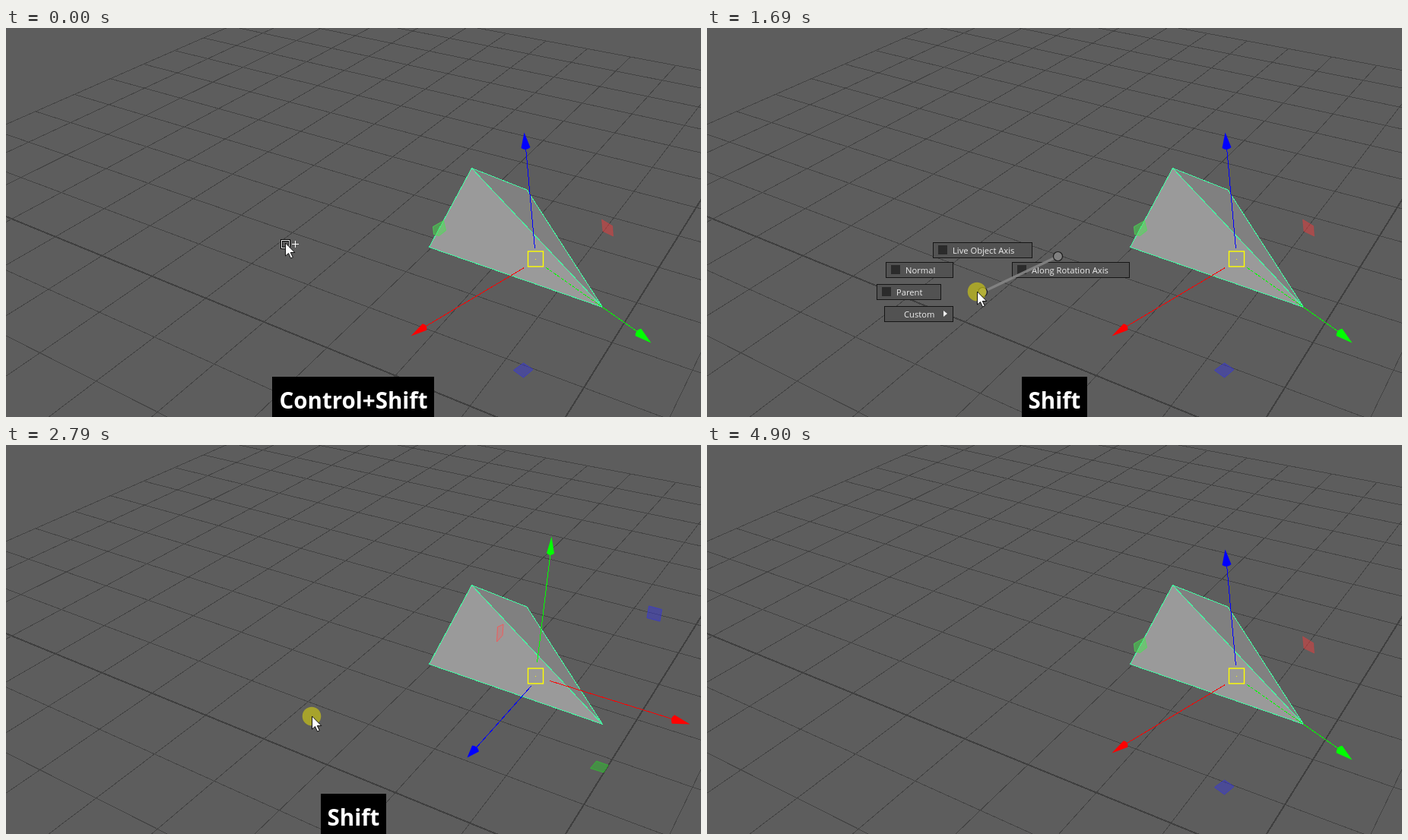
An HTML page that plays this animation: 914 by 512 pixels, repeating every 5.28 s.

```html
<!DOCTYPE html>
<html lang="en">
<head>
<meta charset="utf-8">
<title>Axis marking menu</title>
<style>
  html, body { margin: 0; width: 100%; height: 100%; overflow: hidden; background: #5d5d5d; }
  svg { display: block; width: 100vw; height: 100vh; }
  .label { font: 11.2px "Open Sans", "Noto Sans", sans-serif; fill: #ececec; }
  .key { font: bold 29.5px "Open Sans", "Noto Sans", sans-serif; fill: #fff; text-anchor: middle; }
  .item { fill: #525252; stroke: #161616; }
  .item.on { fill: #5285a6; }
  .crisp { shape-rendering: crispEdges; }
  .trail { stroke: #858585; stroke-width: 3.5; stroke-opacity: .9; fill: none; }
  .hub { fill: #808080; stroke: #1c1c1c; stroke-width: 1.2; }
</style>
</head>
<body>
<svg id="stage" viewBox="0 0 914 512"></svg>
<script>
const LOOP = 5280;
const stage = document.getElementById('stage');
const $ = id => document.getElementById(id);
const range = (a, b) => Array.from({ length: b - a + 1 }, (_, i) => a + i);

// Ground grid: origin, two vanishing points and the weight of one unit along each
const origin = [717, 541], vpA = [-1660, -431], vpB = [1342, -462];
const unitA = 0.0473, unitB = 0.0729;

function project(i, j) {
  const a = i * unitA, b = j * unitB;
  return [0, 1].map(k => ((origin[k] + a * vpA[k] + b * vpB[k]) / (1 + a + b)).toFixed(1));
}

function gridLine(from, to, axis) {
  return `<path d="M${project(...from)}L${project(...to)}" stroke="${axis ? '#3f3f3f' : '#434343'}" stroke-width="${axis ? 2 : 1}"/>`;
}

function grid() {
  const along = range(-4, 12).map(j => gridLine([12, j], [-12, j], j === 0));
  const across = range(-12, 12).map(i => gridLine([i, -4], [i, 12], i === 0));
  return along.concat(across).join('');
}

const pyramid = `
  <path d="M612 184L684.5 212.5L784 367Z" fill="#808080"/>
  <path d="M612 184L784 367L556 288Z" fill="#9a9a9a"/>
  <path d="M612 184L684.5 212.5L784 367L556 288ZL784 367" fill="none" stroke="#43ffa3"/>`;

// Manipulator
function cone(color, bx, by, tx, ty, half) {
  const len = Math.hypot(tx - bx, ty - by);
  const ux = (tx - bx) / len, uy = (ty - by) / len;
  const px = -uy * half, py = ux * half;
  return `<path fill="${color}" d="M${tx} ${ty}L${bx + px} ${by + py}Q${bx - ux * 5} ${by - uy * 5} ${bx - px} ${by - py}Z"/>`;
}

function arrow(color, x, y, bx, by, tx, ty, half = 6) {
  return `<path class="crisp" d="M${x} ${y}L${bx} ${by}" stroke="${color}"/>` + cone(color, bx, by, tx, ty, half);
}

const plane = (color, points, fill = .5, line = .8) =>
  `<polygon points="${points}" fill="${color}" fill-opacity="${fill}" stroke="${color}" stroke-opacity="${line}"/>`;

const objectAxes =
  plane('#46e650', '561,261 575,253 578,266 569,273 562,271', .5, .7) +
  plane('#e04040', '783,251.5 797,260 798,273.5 784.5,267', .55, .4) +
  plane('#3a3ad0', '667,450 680,440.5 692.5,449 680,459.5') +
  arrow('#00f', 695, 290, 683, 157, 681, 137) +
  arrow('#f00', 681, 315, 550, 393, 532, 405, 5) +
  '<path class="crisp" d="M710 315L784 367" stroke="#0f0" stroke-dasharray="4 2"/>' +
  arrow('#0f0', 784, 367, 831, 400, 848, 414);

const parentAxes =
  plane('#ff5050', '646,239 653.5,235.5 652.5,250 645,258.5', .2) +
  plane('#3a3ad0', '845,211.5 862,216 859.5,231.5 842.5,227') +
  plane('#30c030', '776,415.5 791.5,421 785.5,430.5 768,425') +
  arrow('#0f0', 698, 286, 715.5, 142, 717, 120, 5) +
  arrow('#00f', 690, 317, 617, 399, 606, 411) +
  arrow('#f00', 715, 310, 877, 360.5, 899, 367);

const pivot = `
  <rect x="686" y="293.5" width="20" height="20" fill="none" stroke="#ff0" stroke-width="1.4"/>
  <rect x="695.5" y="303.5" width="1" height="1" fill="#ff0"/>`;

// Menus
const tick = (x, y, id = '') =>
  `<path ${id && `id="${id}"`} d="M${x - 4} ${y}l3 3.5l5.5 -7" fill="none" stroke="#f2f2f2" stroke-width="1.7"/>`;

function row(label, x, y, w, kind, tickId) {
  let s = `<text class="label" x="${x + 26}" y="${y + 4.5}">${label}</text>`;
  if (kind === 'sub') s += `<path d="M${x + w - 13} ${y - 4.5}l5 4l-5 4z" fill="#f2f2f2"/>`;
  else s += `<rect x="${x + 7}" y="${y - 6.5}" width="12" height="12" fill="#2b2b2b"/>`;
  if (kind === 'on') s += tick(x + 13, y - .5, tickId);
  return s;
}

const item = (label, x, y, w, kind, id = '') =>
  `<rect class="item" ${id && `id="${id}"`} x="${x + .5}" y="${y + .5}" width="${w - 1}" height="20"/>` +
  row(label, x, y + 10.5, w, kind, id && id + 'Tick');

const rule = y => `<path d="M380 ${y}.5H543" stroke="#777"/>`;

const mainMenu =
  item('Symmetry', 411, 235, 101, 'sub') +
  item('Object', 336, 261, 87, 'on', 'object') +
  item('Component', 500, 261, 113, 'off') +
  item('World', 322, 290, 85, 'off') +
  item('Snap', 516, 290, 79, 'sub') +
  item('Axis', 350, 319, 73, 'sub', 'axis') +
  item('Keep Spacing', 500, 319, 121, 'on') +
  item('Select', 420, 345, 83, 'sub') +
  '<rect class="item" x="379.5" y="387.5" width="164" height="200"/>' +
  row('Selection Constraints', 379, 398, 165, 'sub') +
  row('Transform Constraints', 379, 418, 165, 'sub') +
  rule(429) +
  row('Smart Extrude', 379, 443, 165, 'off') +
  row('Smart Duplicate', 379, 463, 165, 'on') +
  rule(474) +
  row('Preserve Children', 379, 488, 165, 'off') +
  row('Preserve UVs', 379, 508, 165, 'off');

const axisMenu =
  item('Live Object Axis', 297, 282, 131, 'off') +
  item('Normal', 235, 308, 89, 'off') +
  item('Along Rotation Axis', 401, 308, 155, 'off') +
  item('Parent', 223, 337, 85, 'off', 'parent') +
  item('Custom', 233, 366, 91, 'sub');

const pointer = `
  <g id="picker" fill="none">
    <rect x="-4.5" y="-3.5" width="10" height="10" stroke="#fff"/>
    <rect x="-5.5" y="-4.5" width="12" height="12" stroke="#000"/>
    <rect x="-3.5" y="-2.5" width="8" height="8" stroke="#000"/>
    <path id="plus" d="M9 1.5h9M13.5 -3v9" stroke="#fff"/>
  </g>
  <circle id="press" r="12.3" fill="rgb(208,202,18)" fill-opacity=".65"/>
  <path d="M.5 0v17l4 -3.5l3 6.5l2.8 -1.2l-3 -6.3h5.5z" fill="#fff" stroke="#000" stroke-width=".9"/>`;

stage.innerHTML = `
  <rect width="914" height="512" fill="#5d5d5d"/>
  <g transform="translate(.5 .5)">
    <g class="crisp">${grid()}${pyramid}</g>
    <g id="objectAxes">${objectAxes}</g>
    <g id="parentAxes">${parentAxes}</g>
    ${pivot}
  </g>
  <g id="mainMenu">${mainMenu}</g>
  <g id="axisMenu">${axisMenu}</g>
  <g id="trail">
    <path id="trailLine" class="trail"/>
    <circle id="hubA" class="hub" r="6"/>
    <circle id="hubB" class="hub" r="6" cx="362.5" cy="347.5"/>
  </g>
  <g id="keys"><rect id="keyBox" y="459" height="53"/><text id="keyText" class="key" x="457" y="501"></text></g>
  <g id="pointer">${pointer}</g>`;

// Pointer path: time, x, y
const path = [
  [0, 367, 283], [60, 367, 283], [370, 461, 300], [940, 461, 300],
  [1180, 362, 347], [1650, 362, 347], [1900, 259, 348], [2340, 259, 348],
  [2680, 403, 357], [2780, 402, 357], [3310, 402, 357], [3540, 300, 316],
  [3930, 300, 316], [4240, 600, 409], [4320, 664, 428], [4400, 655, 382],
  [4470, 602, 358], [4540, 530, 378], [4620, 445, 443], [LOOP, 445, 443]
];

const still = (p, q) => p[1] === q[1] && p[2] === q[2];

function speed(n, k) {
  const a = path[n - 1], b = path[n], c = path[n + 1];
  if (!a || !c || still(a, b) || still(b, c)) return 0;
  return (c[k] - a[k]) / (c[0] - a[0]);
}

function pointerAt(t) {
  const n = Math.max(0, path.findIndex(p => p[0] > t) - 1);
  const a = path[n], b = path[n + 1], d = b[0] - a[0], u = (t - a[0]) / d;
  const ease = u * u * (3 - 2 * u);
  return [1, 2].map(k => Math.round(a[k] + (b[k] - a[k]) * ease +
    d * u * (1 - u) * ((1 - u) * speed(n, k) - u * speed(n + 1, k))));
}

const show = (id, on) => $(id).setAttribute('visibility', on ? 'inherit' : 'hidden');
const light = (id, on) => $(id).classList.toggle('on', on);

function render(t) {
  const within = (a, b) => t >= a && t < b;
  const [x, y] = pointerAt(t);
  const parentMode = within(2150, 3690);
  const firstMenu = within(570, 1300), subMenu = within(1300, 2150), lastMenu = within(2940, 3690);
  const pressed = within(420, 2150) || within(2790, 3690);

  show('objectAxes', !parentMode);
  show('parentAxes', parentMode);

  show('mainMenu', firstMenu || lastMenu);
  $('mainMenu').setAttribute('transform', lastMenu ? 'translate(-59 57)' : '');
  show('objectTick', firstMenu);
  light('axis', within(1030, 1300));
  light('object', within(3400, 3690));
  show('axisMenu', subMenu);
  light('parent', within(1740, 2150));

  const hub = lastMenu ? [402.5, 357.5] : [461.5, 300.5];
  show('trail', firstMenu || subMenu || lastMenu);
  show('hubB', subMenu);
  $('hubA').setAttribute('cx', hub[0]);
  $('hubA').setAttribute('cy', hub[1]);
  $('trailLine').setAttribute('d', `M${hub}${subMenu ? 'L362.5,347.5' : ''}L${x},${y}`);

  const both = t < 250;
  show('keys', t < 4900);
  $('keyBox').setAttribute('x', both ? 350 : 414);
  $('keyBox').setAttribute('width', both ? 213 : 86);
  $('keyText').textContent = both ? 'Control+Shift' : 'Shift';

  show('pointer', t < 4900);
  $('pointer').setAttribute('transform', `translate(${x} ${y})`);
  show('press', pressed);
  show('picker', !pressed);
  show('plus', both && !pressed);
}

const start = performance.now();
function play() {
  render((performance.now() - start) % LOOP);
  requestAnimationFrame(play);
}
play();
</script>
</body>
</html>
```
